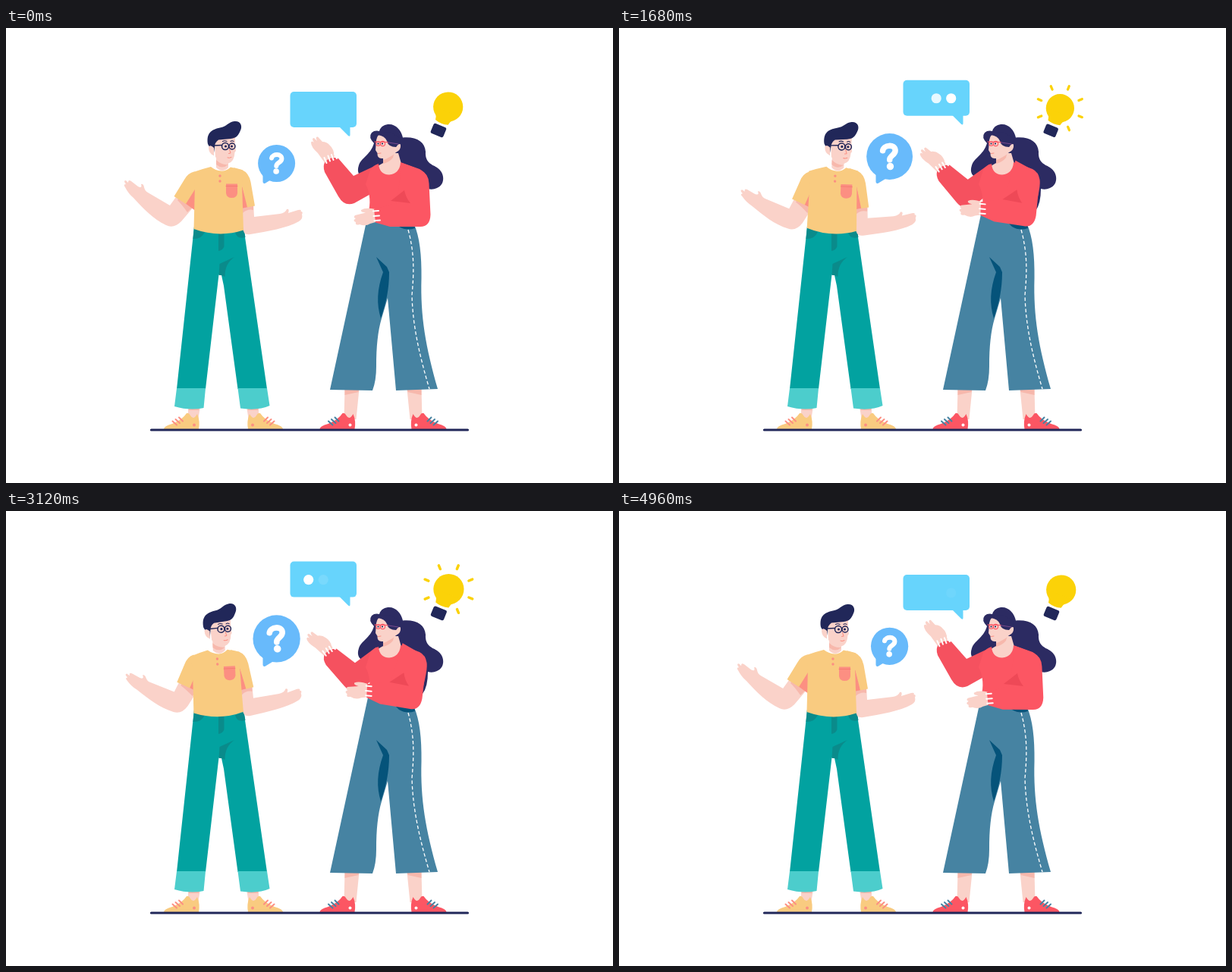
Recreate the animation shown at these times as an HTML page with a canvas. Size 800 by 600 pixels, loop 5000 ms.

```html
<!DOCTYPE html>
<html lang="en">
<head>
<meta charset="utf-8">
<title>Conversation</title>
<style>
  html, body { margin: 0; width: 100%; height: 100%; overflow: hidden; background: #fff; }
  canvas { display: block; width: 800px; height: 600px; }
</style>
</head>
<body>
<canvas id="stage" width="800" height="600"></canvas>
<script>
const ctx = document.getElementById('stage').getContext('2d');
const LOOP = 5000;
const C = {
  navy: '#212759', hair: '#2c2b62', skin: '#fad2c9', blush: '#f7b8ac',
  yellow: '#f9cb80', salmon: '#fc8f82', teal: '#02a2a0', tealDark: '#0a8b8b', mint: '#4ccdcc',
  red: '#fc5663', redShade: '#f5515f', redDark: '#ee4957', denim: '#4683a2', denimDark: '#05537a',
  sky: '#67d4fc', blue: '#68bafb', bulb: '#fbd208', white: '#fff'
};

const clamp = v => Math.max(0, Math.min(1, v));
const smooth = u => u * u * (3 - 2 * u);
const ramp = (t, a, b) => clamp((t - a) / (b - a));

// Eased interpolation through [time, value] pairs.
function keyed(t, keys) {
  let i = 1;
  while (i < keys.length - 1 && t > keys[i][0]) i++;
  const [t0, a] = keys[i - 1], [t1, b] = keys[i];
  return a + (b - a) * smooth(ramp(t, t0, t1));
}

function fill(color, d) {
  ctx.fillStyle = color;
  ctx.fill(new Path2D(d));
}

function line(color, width, d, cap = 'round') {
  ctx.strokeStyle = color;
  ctx.lineWidth = width;
  ctx.lineCap = cap;
  ctx.lineJoin = 'round';
  ctx.stroke(new Path2D(d));
}

function disc(color, x, y, r) {
  ctx.fillStyle = color;
  ctx.beginPath();
  ctx.arc(x, y, r, 0, 7);
  ctx.fill();
}

function ring(color, width, x, y, r) {
  ctx.strokeStyle = color;
  ctx.lineWidth = width;
  ctx.beginPath();
  ctx.arc(x, y, r, 0, 7);
  ctx.stroke();
}

function box(color, x, y, w, h, r) {
  ctx.fillStyle = color;
  ctx.beginPath();
  ctx.roundRect(x, y, w, h, r);
  ctx.fill();
}

function turned(x, y, angle, draw) {
  ctx.save();
  ctx.translate(x, y);
  ctx.rotate(angle);
  ctx.translate(-x, -y);
  draw();
  ctx.restore();
}

function foot(x, dir, color, lace, dot, tall) {
  ctx.save();
  ctx.translate(x, 0);
  ctx.scale(dir, 1);
  if (tall) {
    fill(C.skin, 'M33 476 H52 L48 516 H32Z');
    fill(C.blush, 'M33 476 H52 L51 480 L33 484Z');
  } else {
    fill(C.skin, 'M32 499 H48 L45 518 H32Z');
    fill(C.blush, 'M32 499 H48 L46 504 L33 504Z');
  }
  fill(color, 'M0 529 Q0 525 11 522 Q24 517 30 508 Q33 507 35 511 Q39 518 44 509 Q48 518 46 529Z');
  line(lace, 2, 'M11.5 518.5 L17 523.5 M15.5 516 L21 521 M20 513.5 L25 518.5');
  disc(dot, 40, 523.5, 2);
  ctx.restore();
}

function manLegs() {
  foot(208, 1, C.yellow, C.salmon, C.salmon, false);
  foot(365, -1, C.yellow, C.salmon, C.salmon, false);
  fill(C.teal, 'M248 262 H313 L344 476 H305.5 L287 340 L284 326 L280.5 325 L263 476 H225Z');
  fill(C.mint, 'M225 475 H263 L260.5 501 Q242 505 222 499Z M305.5 475 H344 L347.5 498 Q332 505 309 501.5Z');
  fill(C.tealDark, 'M248 262 L262 269 Q257 279 246.5 278Z M302 269 L313.5 265 L315.5 276 Q304 279 302 269Z');
  fill(C.tealDark, 'M280 270 H287.5 V288 Q286 293 280 294Z');
  fill(C.tealDark, 'M280.5 326 L281.5 311 L301 302 Q288 311 288.5 328 L284 326Z');
}

function manLeftArm() {
  fill(C.skin, 'M226 220 L248 235 L231 255 Q221 265 211 260 C194 252 181 238 168 224 ' +
    'Q161 218 157 210 Q154 206 158 206 Q154 201 158 201 L161 204 Q161 199 165 202 ' +
    'L174 209 Q180 212 178 206 Q181 205 182 210 Q183 215 187 217 L216 234Z');
  fill(C.blush, 'M228 223 L246 236 L239 243 Q232 233 226 227Z');
  fill(C.salmon, 'M252 203 L236 231 L251 242Z');
  fill(C.yellow, 'M258 192 L248 189.5 Q240 191 235 200 L221.5 222 L237 232 L252 208 L262 200Z');
}

function manRightArm() {
  fill(C.skin, 'M311 230 L326 230 L327 249 L361 245 Q368 244 370 239 Q374 238 372 244 ' +
    'L385 240 Q390 239 388.5 242 Q392 242 390 246 Q392 251 386 255 C370 264 345 268 322 272 Q312 274 312 262Z');
  fill(C.blush, 'M311 235 L326 235 L326 240 Q318 238 312 244Z');
  fill(C.salmon, 'M310 203 L319 236 L310 238Z');
  fill(C.yellow, 'M300 184 L311 187 Q320 191 322.5 203 L328 234.5 L318 236.5 L310 204Z');
}

function manTorso() {
  fill(C.skin, 'M277 166 L277 184 Q285 192 293 184 V172Z');
  fill(C.blush, 'M277 174 Q284 181 293 180 Q285 187 277 180Z');
  fill(C.yellow, 'M270 183 Q258 186 247 190 L249 206 L247.5 265 Q281 277 313 266.5 L311 206 L312 187.5 ' +
    'L296 183.5 Q290 189 284 188.5 Q276 188 270 183Z');
  disc(C.salmon, 282, 195, 1.7);
  disc(C.salmon, 282, 202, 1.7);
  fill(C.salmon, 'M290 205.5 H305 V218 Q304 224 297.5 224 Q291 224 290 218Z');
  line('#f4776f', 0.8, 'M290 208.5 H305');
}

function manHead() {
  fill(C.skin, 'M274 142 L302 140 L302 156 L303 162 L301.5 164 Q301 176 293 178.5 Q283 179 276 170Z');
  fill(C.navy, 'M266 153 C264 139 270 134 282 131.5 C291 130 293 124 301 123 C309 122 312 129 309 135 ' +
    'C306 142 304 145 296 146 L280 147.5 Q275 151 275 157 L273.5 168 L270 160Z');
  fill(C.skin, 'M274 158 Q269 153 267 157 Q267 166 274 168Z');
  line(C.navy, 1.4, 'M274 155 L284.5 154.5');
  ring(C.navy, 1.5, 289, 156, 4.5);
  ring(C.navy, 1.5, 298, 156, 4);
  disc(C.navy, 289.5, 156, 1.6);
  disc(C.navy, 297.5, 156, 1.6);
  line(C.navy, 1.1, 'M285.5 149.5 Q288 148 291 149.5 M296 149.5 Q298 148 300 149.5');
  line(C.salmon, 1, 'M294.5 160 L296 165 L293.5 165.5 M292 171 Q294 172 297 170.5');
}

function man(p, lean) {
  manLegs();
  turned(280, 268, lean, manRightArm);
  ctx.save();
  ctx.translate(lean * 38, 0);
  turned(250, 186, -0.2 * p, manLeftArm);
  ctx.restore();
  turned(280, 268, lean, () => { manTorso(); manHead(); });
}

function womanHair() {
  fill(C.hair, 'M485 152 Q477 144 482 138 Q486 134.5 492 136 C494 129 500 127 505 127 C514 127 521 135 523 144.5 ' +
    'C541 143 552 150 553 163 C552 178 562 180 568 184 C579 191 579 207 568 211 Q562 214 556 212 ' +
    'Q556 232 549 241 L530 220 L475 198 C465 197 462 190 465 181 C468 171 480 168 485 152Z');
}

function womanHead() {
  fill(C.skin, 'M497 165 H517 L521 179 Q518 196 505 196 Q491 194 490 182 L497 178Z');
  fill(C.blush, 'M497 174 Q506 172 512 163 L510 171 Q505 177 497 179Z');
  fill(C.skin, 'M488 148 Q489 140 498 138 L508 150 L517 153 L514 164 Q505 173 495 172 Q489 172 489.5 165 L487 161Z');
  fill(C.hair, 'M490 141 Q498 135 508 138 L519 145 L521 152 L514 157 Q504 157 502 149 Q499 142 490 141Z');
  fill(C.skin, 'M514 158 Q517 151.5 520 153.5 Q521 161 514 164Z');
  line('#7a4a8d', 1, 'M501 150.5 L517 153');
  line(C.red, 1.2, 'M486 150 L503 150.5');
  ring(C.red, 1.1, 490.5, 152.5, 2.8);
  ring(C.red, 1.1, 496.5, 152.5, 3.1);
  disc(C.navy, 490.5, 152.5, 1.1);
  disc(C.navy, 496, 152.5, 1.1);
  line(C.salmon, 1, 'M490.5 165.5 L494 165');
}

function womanLegs() {
  foot(413.5, 1, C.red, C.denim, C.white, true);
  foot(580.5, -1, C.red, C.denim, C.white, true);
  fill(C.denim, 'M477 246 L538 259 C545 275 548 300 547.5 330 C546 380 553 420 569 476 L514 478 L503 356 ' +
    'L495 383 C490 400 488 420 488 446 Q488 465 483 478 L427 477Z');
  fill(C.denimDark, 'M488 302 L502 315 L505 322 C505 345 501 362 494 383 C488 364 489 344 497 322Z');
  fill(C.denimDark, 'M514 258 L538 258 L539 264 Q528 268 518 262Z');
  ctx.setLineDash([4.5, 3]);
  line(C.white, 1.3, 'M530 266 C538 295 538 320 535 352 C536 395 546 435 558 476', 'butt');
  ctx.setLineDash([]);
}

function womanTorso() {
  fill(C.red, 'M491 179 Q484 181 480 187 L474 206 Q483 224 477 246 L510 254 L538 260 L549 235 Q556 208 554.5 200 ' +
    'Q553 190 545 186 L520 177 Q519 192 505 193.5 Q492 193 491 179Z');
}

function raisedArm() {
  fill(C.skin, 'M421 179 L411 165 Q402 157 402 151 Q403 148 406 151 Q402 145 406 145 L410 149 ' +
    'Q407 143 411 143.5 L417 150 Q423 150 427 155 Q432 159 433 170Z');
  fill(C.redShade, 'M490 180 L458 195 L438 172 Q429 169 421 176 Q417 181 420 190 L438 222 Q446 236 459 231 L484 217Z');
  line(C.white, 2, 'M422.5 178 L419.5 171 M427 175.5 L424.5 168.5 M431.5 174 L429 167 M436 172 L433 165.5');
}

function foldedArm() {
  fill(C.skin, 'M487 239 Q474 236 468 240 Q467 243 474 243.5 L460 247 Q457 250 461 251 Q456 254 461 256 ' +
    'Q460 261 466 259 Q474 262 480 258 L487 256Z');
  fill(C.red, 'M522 178 L546 187 Q557 192 557.5 205 L559.5 246 Q559 262 546 262 L506 262 L487 256.5 L485 239 L515 230Z');
  line(C.white, 2, 'M484 241.5 L491 241 M484.5 248 L492 247.5 M485.5 254 L493 253.5');
}

function woman(p) {
  womanHair();
  womanLegs();
  turned(485, 188, -0.27 * p, raisedArm);
  womanHead();
  womanTorso();
  turned(545, 180, 0.22 * p, foldedArm);
  turned(535, 205, 0.1 * p, () => fill(C.redDark, 'M507 228 L525 214 Q527 224 533 231Z'));
}

function questionBubble(p) {
  const y = 178.5 - 13.4 * p, size = 1 + 0.36 * p;
  fill(C.blue, 'M338.5 190 L338.5 203 Q339 206 342 204.5 L351 199 L352 190Z');
  disc(C.blue, 356.6, y, 24.5 * size);
  ctx.save();
  ctx.translate(356.6, y);
  ctx.scale(size, size);
  ctx.rotate(-0.17 * p);
  line(C.white, 6, 'M-6.5 -7 C-5 -13 7 -13 6.8 -6 C6.5 -0.8 -0.2 -1 -0.3 3.5');
  disc(C.white, -0.5, 10.5, 3.8);
  ctx.restore();
}

function typingBubble(t) {
  const rise = keyed(t, [[300, 0], [2250, 19.2], [2694, 19.2], [4958, 0]]);
  ctx.save();
  ctx.translate(0, -rise);
  box(C.sky, 374.5, 84, 87.5, 47, 5);
  fill(C.sky, 'M439 130 L451 142 Q453.5 144 453.5 141 V130Z');
  const c = t % 2680;
  for (let i = 0; i < 3; i++) {
    const shown = ramp(c, 80 + 320 * i, 400 + 340 * i);
    const gone = ramp(c, 1300 + 330 * i, 1640 + 330 * i);
    ctx.globalAlpha = shown * (1 - gone);
    disc(C.white, 398.7 + 19.5 * i, 108, 6.6);
  }
  ctx.restore();
}

function lightBulb(t) {
  const size = keyed(t, [[1000, 1], [1640, 0.945], [2140, 1.265], [2760, 1.03], [4300, 1]]);
  ctx.save();
  ctx.translate(555, 140);
  ctx.scale(size, size);
  ctx.translate(27.7, -36);
  ctx.rotate(0.39);
  disc(C.bulb, 0, 0, 19.6);
  fill(C.bulb, 'M-18.5 6 Q-10 14 -9 22 Q0 25 9 22 Q10 14 18.5 6Z');
  box(C.navy, -9, 26.5, 18, 14, 2.5);
  ctx.globalAlpha = ramp(t, 900, 1300) * (1 - ramp(t, 3750, 4350));
  for (let i = 0; i < 8; i++) {
    if (i !== 2) line(C.bulb, 3.4, 'M28 0 H33');
    ctx.rotate(Math.PI / 4);
  }
  ctx.restore();
}

function draw(t) {
  const p = 1 - Math.abs(t / (LOOP / 2) - 1);
  const lean = keyed(t, [[0, 0], [1250, 5.2], [1750, 5.2], [2900, -6.6], [3500, -6.6], [LOOP, 0]]) / 133;
  ctx.fillStyle = C.white;
  ctx.fillRect(0, 0, 800, 600);
  man(p, lean);
  woman(p);
  line(C.navy, 3.2, 'M191.5 530 H608.5');
  questionBubble(p);
  typingBubble(t);
  lightBulb(t);
}

const start = performance.now();
function tick() {
  draw((performance.now() - start) % LOOP);
  requestAnimationFrame(tick);
}
tick();
</script>
</body>
</html>
```
